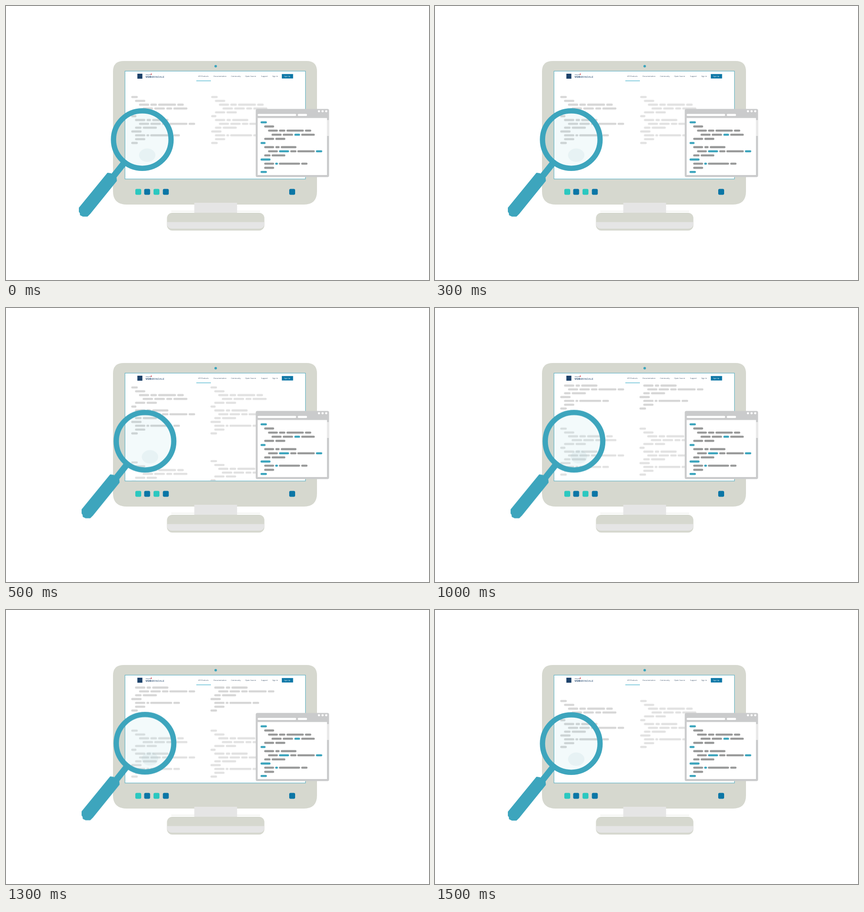
Recreate the animation shown at these times as an HTML page. Size 929 by 603 pixels, loop 2 s.

```html
<!DOCTYPE html>
<html lang="en">
<head>
<meta charset="utf-8">
<title>Code search</title>
<style>
  html, body { margin: 0; width: 100%; height: 100%; overflow: hidden; background: #fff; }
  svg { display: block; width: 929px; height: 603px; }
  text { font-family: "Open Sans", sans-serif; font-size: 3.9px; fill: #3c5068; text-rendering: geometricPrecision; }
  .brand { font-family: Lato, sans-serif; font-size: 5.4px; letter-spacing: .35px; fill: #1d426b; }
  .owner { font-family: Lato, sans-serif; font-size: 2.4px; font-weight: 700; fill: #1d426b; }
</style>
</head>
<body>
<svg viewBox="0 0 929 603">
  <clipPath id="page"><rect x="262" y="167" width="395" height="213"/></clipPath>

  <g id="monitor">
    <path fill="#d6d8cf" d="M259 121H660Q683 121 683 144V408Q683 437 654 437H266Q235 437 235 408V144Q235 121 259 121Z"/>
    <circle cx="460.5" cy="132.5" r="2.8" fill="#3da5bd"/>
    <rect x="261.3" y="143.3" width="396.4" height="237.4" fill="#fff" stroke="#4fadc2"/>
    <path stroke="#e4e5df" d="M363 451.5H558"/>
    <rect x="413.5" y="433" width="94" height="23" fill="#e5e5e5"/>
    <rect x="353.5" y="455" width="214" height="39.3" rx="12" fill="#d6d8cf"/>
    <path fill="#e5e5e5" d="M353.5 475.5H567.5V478Q567.5 490 555.5 490H365.5Q353.5 490 353.5 478Z"/>
  </g>
  <g id="keys"></g>

  <g id="header">
    <rect x="288.5" y="149" width="11" height="11" fill="#1d426b"/>
    <text class="owner" x="306.8" y="152.4">Nordel Bay</text>
    <circle cx="319" cy="150" r="1.2" fill="#d0343c"/>
    <text class="brand" x="306.5" y="158.2"><tspan font-weight="900">VOR</tspan>BRINDALE</text>
    <rect x="418" y="164" width="32" height="1.3" fill="#55b9d0"/>
    <rect x="605.8" y="149.7" width="24.7" height="9.8" rx=".6" fill="#0b76a6"/>
  </g>

  <g id="code" clip-path="url(#page)"></g>

  <g id="popup">
    <rect x="548.5" y="226.5" width="161" height="150" rx="3.5" fill="#cacbcc"/>
    <rect x="552.7" y="246.5" width="152.2" height="125.5" fill="#fff"/>
    <rect x="552.7" y="237.4" width="84.6" height="4.7" rx="2" fill="#fff"/>
    <rect x="640.7" y="237.4" width="20.5" height="4.7" rx="2" fill="#fff"/>
    <rect x="705" y="251" width="4.5" height="35" fill="#e9e9e9"/>
    <g fill="#fff">
      <circle cx="687.3" cy="231.6" r="2.4"/>
      <circle cx="695.3" cy="231.6" r="2.4"/>
      <circle cx="703.3" cy="231.6" r="2.4"/>
    </g>
  </g>

  <g id="lens">
    <circle cx="299.3" cy="294" r="58" fill="#3da5bd" fill-opacity=".06"/>
    <ellipse cx="310.2" cy="328.3" rx="18" ry="14.7" fill="#3d8b98" fill-opacity=".065"/>
    <circle cx="299.3" cy="294" r="63.2" fill="none" stroke="#3da5bd" stroke-width="11.6"/>
    <path stroke="#3da5bd" stroke-width="14" d="M260.5 344L233 378.5"/>
    <path fill="#3da5bd" stroke="#3da5bd" stroke-width="3" stroke-linejoin="round"
      d="M223.5 368.5L230 369.5L241.5 379L242 384.5L183.5 457L178.5 462H169L164 459.5L163.5 455L161.5 452.5V444.5Z"/>
  </g>
</svg>
<script>
const $ = id => document.getElementById(id);

function add(parent, tag, attrs, text = '') {
  const el = document.createElementNS('http://www.w3.org/2000/svg', tag);
  for (const k in attrs) el.setAttribute(k, attrs[k]);
  el.textContent = text;
  return parent.appendChild(el);
}

// Each line of code: "start-end" bars; * marks a highlighted token.
const lines = `0-14.5*
8.3-31
17-39.5 42-56.5 59-98.5 101-115.5
25-48 50.5-74 77-90* 92.5-123.5
8.3-31 33.7-56.5
0-11.5*
8.3-31 33.7-43.5 46-81.8
17-39.5 42-65* 67.5-81.8 83.7-123.5 126-140.5*
8.3-22.8 25.3-56.5
0-22.8*
8.3-31 33.3-39.7* 41.7-90 92.5-107
8.3-31
0-14.5*`.split('\n').map(row => row.split(' '));

function drawCode(parent, x, y, sx, step, lit) {
  lines.forEach((row, i) => row.forEach(bar => {
    const [a, b] = bar.split('-').map(parseFloat);
    const attrs = { x: x + a * sx, y: y + i * step - 2.3, width: (b - a) * sx, height: 4.6, rx: 2.2 };
    if (lit) attrs.fill = bar.endsWith('*') ? lit : '#999a9a';
    add(parent, 'rect', attrs);
  }));
}

drawCode($('popup'), 559, 256, .965, 9.1, '#3da5bd');

[[284, '#2bc8c0'], [303.5, '#0b76a6'], [324, '#2bc8c0'], [344.5, '#0b76a6'], [622, '#0b76a6']]
  .forEach(([x, fill]) => add($('keys'), 'rect', { x, y: 402.5, width: 13, height: 13, rx: 3, fill }));

[['API Products', 422], ['Documentation', 455.8], ['Community', 494.3], ['Open Source', 525.5],
 ['Support', 560.3], ['Sign In', 585], ['Sign Up', 610.5]]
  .forEach(([label, x]) => add($('header'), 'text', { x, y: 156, style: x > 600 ? 'fill:#fff' : '' }, label));

// Holds each pose for a quarter of the loop; the last equals the first.
function play(el, poses) {
  const frames = [0, 1, 2, 0, 0].map((p, i) => {
    const [x, y, fill] = poses[p];
    const frame = { offset: i / 4, easing: 'step-end', transform: `translate(${x}px, ${y}px)` };
    return fill ? { ...frame, fill } : frame;
  });
  el.animate(frames, { duration: 2000, iterations: Infinity });
}

const dark = '#d6d6d6', pale = '#e1e1e1';
[
  [[275, 200.3, dark], [275, 174.8, dark], [275, 120.1, dark]],
  [[275, 400, pale], [275, 339.8, pale], [275, 265.5, pale]],
  [[450.5, 200.3, pale], [449, 174.8, pale], [449, 120.1, dark]],
  [[450.5, 400, pale], [449, 337, pale], [449, 265.5, pale]]
].forEach(poses => {
  const block = add($('code'), 'g', {});
  drawCode(block, 0, 0, 1, 8.43);
  play(block, poses);
});

play($('lens'), [[0, 0], [6, -.8], [6, -.8]]);
</script>
</body>
</html>
```
